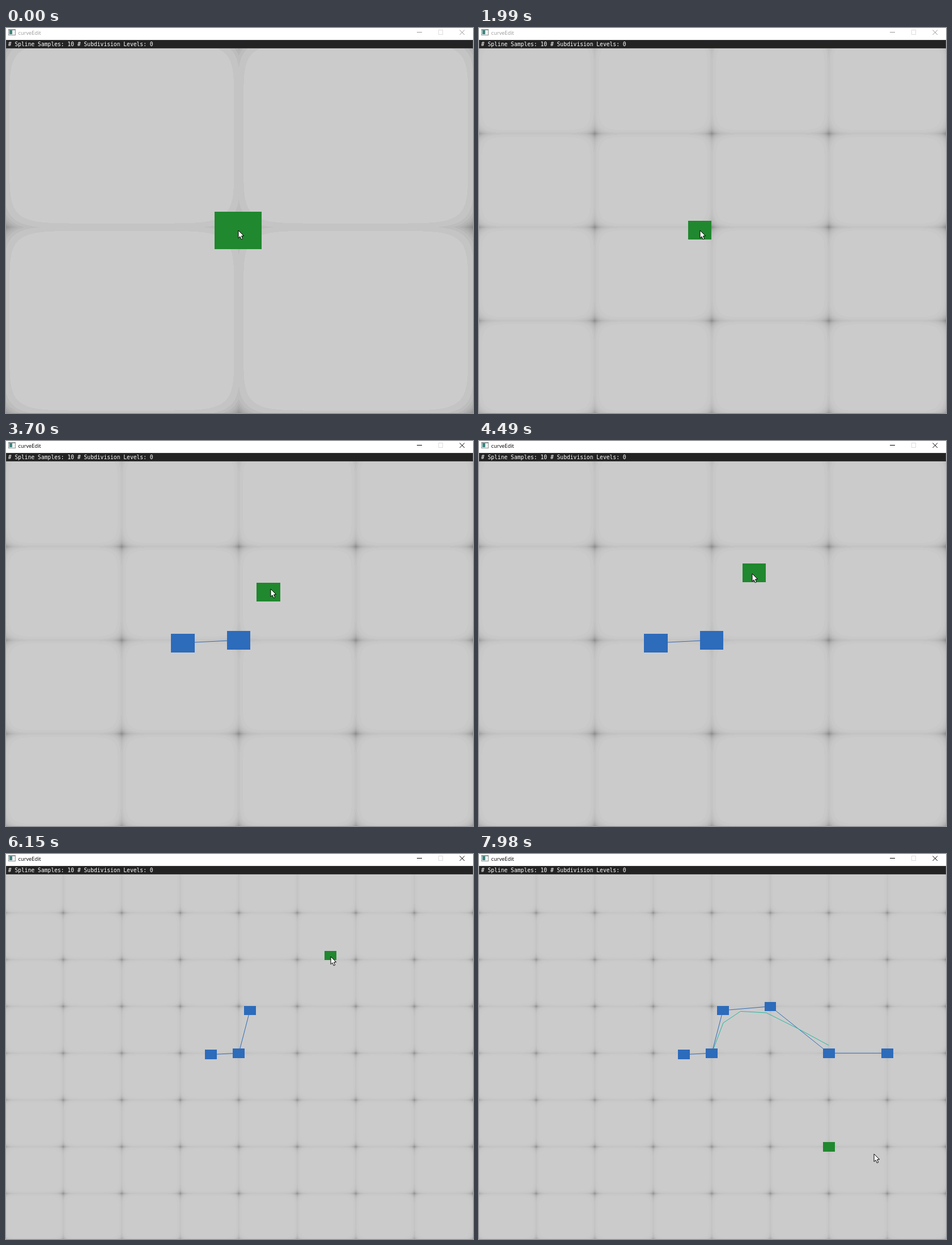
An HTML page with a canvas for the animation above (8000 ms loop, 824x679 px).

```html
<!DOCTYPE html>
<html lang="en">
<head>
<meta charset="utf-8">
<title>curveEdit</title>
<style>
  html, body { margin: 0; width: 100%; height: 100%; overflow: hidden; background: #fff; }
  canvas { display: block; }
</style>
</head>
<body>
<canvas id="stage" width="824" height="679"></canvas>
<script>
const W = 824, H = 679, LOOP = 8000;
const CX = 410.75, CY = 351.25, CELL_W = 413, CELL_H = 330;
const BLUE = '#2d6bbb', GREEN = '#20882e', RED = '#d84a4a', TEAL = '#22b8a0';
const SAMPLES = 10;
const ctx = document.getElementById('stage').getContext('2d');

// Pointer moves: start, end, target x, y; the pointer rests in between
const START = [410, 357];
const MOVES = [
  [1270, 1740, 390, 357], [1990, 2300, 380, 365], [2300, 2790, 366, 340],
  [2900, 3080, 312.5, 356.5], [3400, 3610, 452, 284], [3640, 3850, 505, 204],
  [3850, 4100, 536, 225], [4290, 4490, 482, 234], [4490, 4640, 450.5, 201],
  [4760, 5070, 568, 171], [5100, 5270, 573, 168], [5910, 6700, 573, 209],
  [7020, 7200, 640, 300], [7200, 7520, 701, 330], [7540, 7620, 722, 342],
  [7700, 7970, 697, 529]
];
const CLICKS = [3120, 3320, 4700, 7000, 7350, 7680];

const zoomAt = t => t < 990 ? 1 : t < 5910 ? 2 : 4;
const snapped = t => (t >= 3200 && t < 3400) || t >= 6790;
const mix = (a, b, f) => [a[0] + (b[0] - a[0]) * f, a[1] + (b[1] - a[1]) * f];

function pointer(t) {
  let pos = START;
  for (const [from, to, x, y] of MOVES) {
    if (t <= from) break;
    pos = mix(pos, [x, y], Math.min(1, (t - from) / (to - from)));
  }
  return pos;
}

// The brush trails the pointer a little and can snap towards the centre
function brush(t) {
  const z = zoomAt(t), [x, y] = pointer(t - 16);
  if (!snapped(t)) return [x - 0.5, y - 0.5];
  const snap = (p, mid, cell) => mid + Math.trunc((p - mid) / cell) * cell;
  return [snap(x, CX, CELL_W / z), snap(y, CY, CELL_H / z)];
}

// Points as offsets from the centre at zoom 1
const points = CLICKS.map(time => {
  const [x, y] = brush(time), z = zoomAt(time);
  return { time, x: (x - CX) * z, y: (y - CY) * z };
});

// Grid shading: superellipse cells in stepped greys
function makeGrid(z) {
  const c = document.createElement('canvas');
  c.width = W;
  c.height = H;
  const g = c.getContext('2d'), img = g.createImageData(W, H), step = 7 / z;
  const term = (p, mid, size) => {
    const f = (p + 0.5 - mid) * z / size;
    return Math.pow(Math.abs(f - Math.floor(f) - 0.5) * 2, 7.1);
  };
  const cols = Array.from({ length: W }, (_, x) => term(x, CX, CELL_W));
  for (let y = 36; y < H; y++) {
    const row = term(y, CY, CELL_H);
    for (let x = 0; x < W; x++) {
      const v = 203 - step * Math.round(8.4 * Math.pow(cols[x] + row, 3) / step);
      img.data.set([v, v, v, 255], (y * W + x) * 4);
    }
  }
  g.putImageData(img, 0, 0);
  return c;
}
const grids = { 1: makeGrid(1), 2: makeGrid(2), 4: makeGrid(4) };

function polyline(pts, color) {
  ctx.strokeStyle = color;
  ctx.lineWidth = 1;
  ctx.beginPath();
  pts.forEach(p => ctx.lineTo(p[0], p[1]));
  ctx.stroke();
}

function square([x, y], z, color) {
  const w = CELL_W * 0.2 / z, h = CELL_H * 0.2 / z;
  const l = Math.round(x - w / 2), t = Math.round(y - h / 2);
  ctx.fillStyle = color;
  ctx.fillRect(l, t, Math.round(x + w / 2) - l, Math.round(y + h / 2) - t);
}

const blend = (pts, weights) =>
  [0, 1].map(d => weights.reduce((sum, w, i) => sum + w * pts[i][d], 0));

// Curve hugging the middle of three points
function corner([a, b, c]) {
  const ends = [mix(b, a, 0.67), b, mix(b, c, 0.56)];
  return Array.from({ length: SAMPLES }, (_, i) => {
    const t = i / (SAMPLES - 1), s = 1 - t;
    return blend(ends, [s ** 3, 3 * s * t, t ** 3]);
  });
}

// Uniform cubic B-spline, sampled over the whole point list
function spline(p) {
  const out = [p[1]], n = p.length;
  for (let i = 0; i < SAMPLES; i++) {
    const u = i * (n - 1) / (SAMPLES - 1) - 2;
    if (u < 0.3) continue;
    const k = Math.min(Math.floor(u), n - 4), t = u - k;
    const w = [(1 - t) ** 3, 3 * t ** 3 - 6 * t * t + 4, -3 * t ** 3 + 3 * t * t + 3 * t + 1, t ** 3];
    out.push(blend(p.slice(k, k + 4), w.map(v => v / 6)));
  }
  return out;
}

function drawArrow([x, y]) {
  const shape = [[0, 0], [0, 13.5], [3, 10.8], [5.2, 15.8], [7.6, 14.8], [5.5, 9.9], [9.6, 9.6]];
  ctx.beginPath();
  shape.forEach(([a, b]) => ctx.lineTo(Math.round(x) + a, Math.round(y) + b));
  ctx.closePath();
  ctx.fillStyle = '#fff';
  ctx.fill();
  ctx.strokeStyle = '#000';
  ctx.lineWidth = 1;
  ctx.stroke();
}

function box(color, x, y, w, h) {
  ctx.fillStyle = color;
  ctx.fillRect(x, y, w, h);
}

function drawWindow(active) {
  const ink = active ? '#000' : '#999';
  box('#fff', 0, 0, W, 21);
  box('#3c3c40', 0, 21, W, 15);
  box('#232323', 1, 22, W - 2, 13);

  box('#8a9494', 4, 2, 13, 11);
  box('#f4f4f4', 5, 4, 11, 8);
  box('#3c8580', 6, 4, 5, 7);

  box(ink, 725, 7, 9, 1);
  ctx.strokeStyle = '#ddd';
  ctx.lineWidth = 1;
  ctx.strokeRect(763.5, 3.5, 7, 8);
  polyline([[800.5, 3.5], [809, 12]], ink);
  polyline([[809, 3.5], [800.5, 12]], ink);

  ctx.fillStyle = ink;
  ctx.font = '9.3px "Open Sans", sans-serif';
  ctx.fillText('curveEdit', 21.5, 11.5);
  ctx.fillStyle = '#fff';
  ctx.font = '9.67px "DejaVu Sans Mono", monospace';
  ctx.fillText('# Spline Samples: 10 # Subdivision Levels: 0', 3.8, 32);
}

function draw(t) {
  const z = zoomAt(t);
  ctx.drawImage(grids[z], 0, 0);

  const pts = points.filter(p => t >= p.time).map(p => [CX + p.x / z, CY + p.y / z]);
  polyline(pts, BLUE);
  if (pts.length === 3 && t < 5670) polyline(corner(pts), RED);
  if (pts.length > 3) polyline(spline(pts), TEAL);
  pts.forEach(p => square(p, z, BLUE));
  square(brush(t), z, GREEN);

  drawWindow(t >= 2150);
  drawArrow(pointer(t));
}

function tick() {
  draw(performance.now() % LOOP);
  requestAnimationFrame(tick);
}
tick();
</script>
</body>
</html>
```
